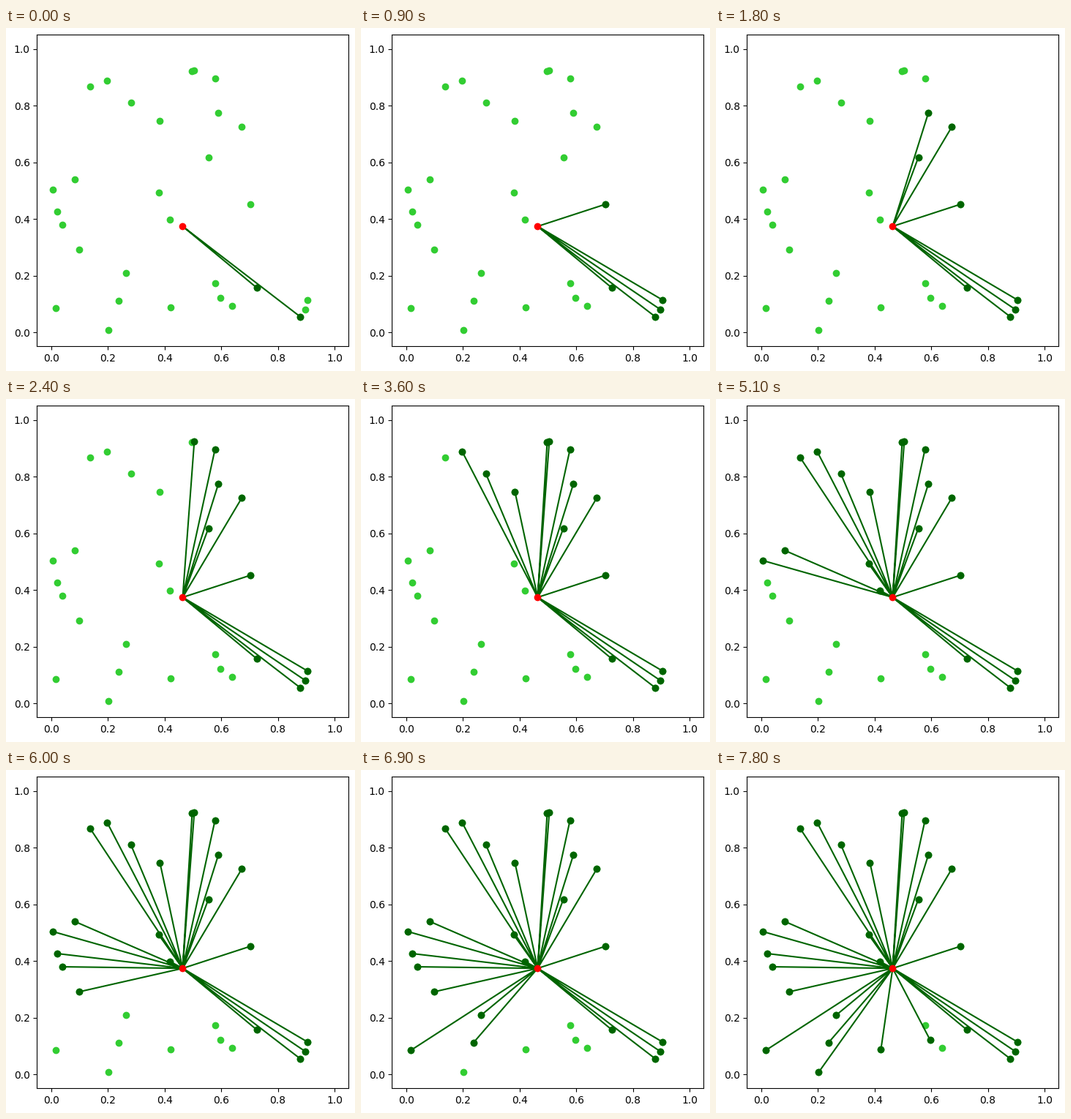
A matplotlib script that plays this animation: 477 px wide and 469 px high, repeating every 8 s.

```python
import numpy as np
import matplotlib.pyplot as plt
from matplotlib.animation import FuncAnimation

WIDTH, HEIGHT, DPI = 477, 469, 100
INTERVAL, FRAMES, FRAMES_PER_STEP = 100, 80, 3
FIRST_COUNT = 2
START_ANGLE = -np.pi / 4

center = np.array([0.464, 0.374])
points = np.array([
    (0.138, 0.867), (0.198, 0.888), (0.281, 0.811), (0.384, 0.746),
    (0.4975, 0.9215), (0.505, 0.924), (0.578, 0.896), (0.590, 0.7745),
    (0.673, 0.7255), (0.5545, 0.617), (0.7035, 0.452), (0.379, 0.493),
    (0.420, 0.398), (0.082, 0.540), (0.007, 0.5035), (0.0225, 0.426),
    (0.0405, 0.3795), (0.100, 0.2915), (0.265, 0.209), (0.237, 0.111),
    (0.017, 0.085), (0.203, 0.0075), (0.4225, 0.0875), (0.580, 0.173),
    (0.596, 0.1215), (0.6395, 0.093), (0.725, 0.1575), (0.8795, 0.0545),
    (0.8975, 0.080), (0.9055, 0.1135),
])

# Sweep counter-clockwise around the center.
dx, dy = (points - center).T
angles = (np.arctan2(dy, dx) - START_ANGLE) % (2 * np.pi)
points = points[np.argsort(angles)]

# Each spoke is center, point, gap.
spokes = np.full((len(points), 3, 2), np.nan)
spokes[:, 0] = center
spokes[:, 1] = points

# The small margin keeps the pixel size from being rounded down.
fig = plt.figure(figsize=((WIDTH + 0.01) / DPI, (HEIGHT + 0.01) / DPI), dpi=DPI)
ax = fig.add_axes([42.4 / WIDTH, 33.6 / HEIGHT, 426 / WIDTH, 426 / HEIGHT])
ax.set(xlim=(-0.05, 1.05), ylim=(-0.05, 1.05))

ax.plot(*points.T, "o", color="limegreen")
fan, = ax.plot([], [], "o-", color="darkgreen", markevery=(1, 3))
ax.plot(*center, "o", color="red", zorder=3)


def update(frame):
    count = FIRST_COUNT + frame // FRAMES_PER_STEP
    fan.set_data(*spokes[:count].reshape(-1, 2).T)
    return fan,


anim = FuncAnimation(fig, update, frames=FRAMES, interval=INTERVAL,
                     repeat=True, repeat_delay=0)
plt.show()
```
